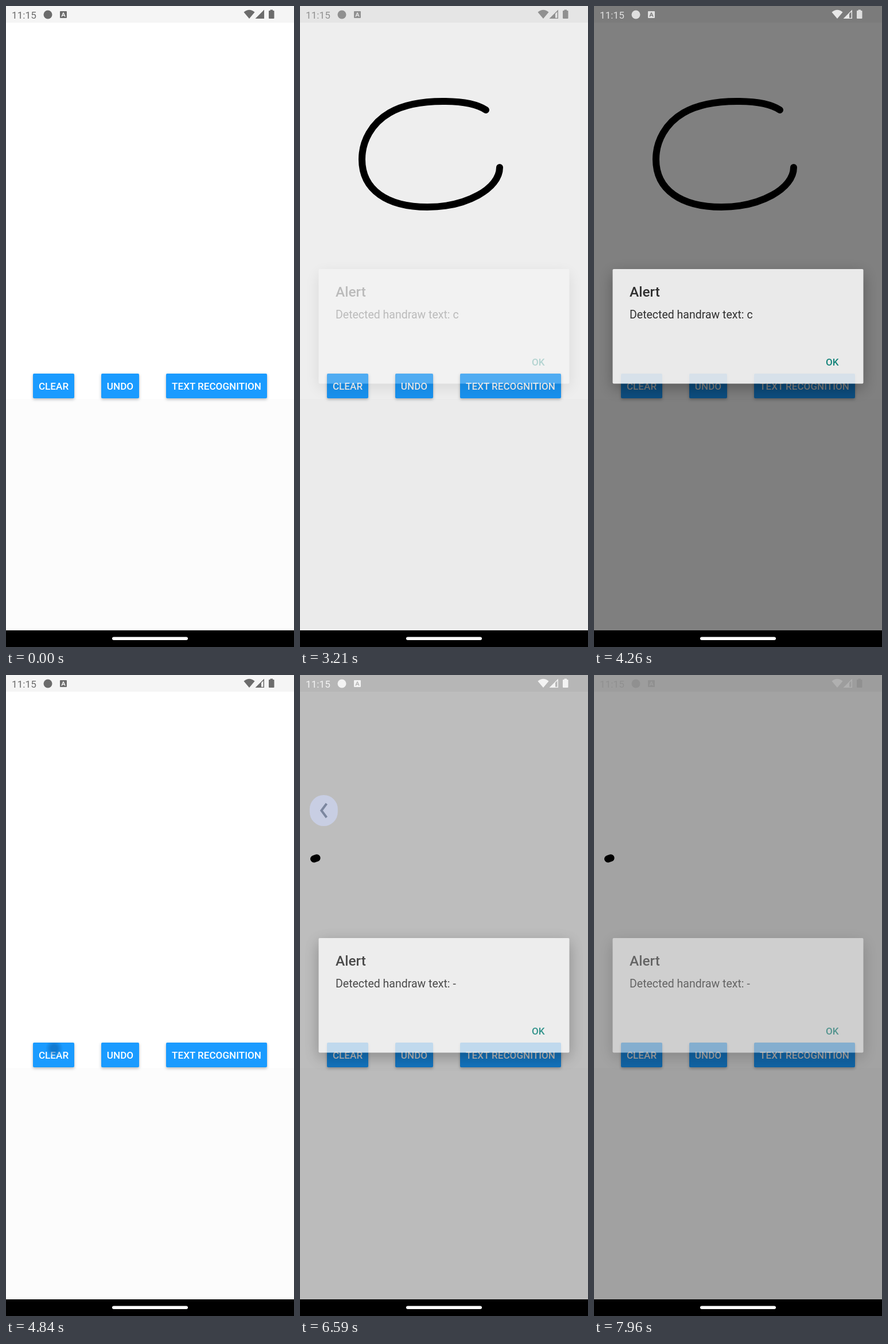
Animation of 502 by 1116 pixels, one loop 8 s. Source, as an HTML page:

```html
<!DOCTYPE html>
<html lang="en">
<head>
<meta charset="utf-8">
<title>Handwriting pad</title>
<style>
  html, body { margin: 0; width: 100%; height: 100%; overflow: hidden; background: #fff; }
  svg { display: block; width: 100%; height: 100%; }
  text { font-family: Roboto, sans-serif; }
  .medium { font-weight: 500; }
  .ink { fill: none; stroke: #000; stroke-linecap: round; stroke-linejoin: round; }
  .raised { filter: drop-shadow(0 2px 2.5px rgba(0, 0, 0, .27)); }
  #dialog .card { filter: drop-shadow(0 8px 13px rgba(0, 0, 0, .36)); }
</style>
</head>
<body>
<svg viewBox="0 0 502 1116">
  <defs>
    <clipPath id="clearClip"><rect x="47" y="640" width="72" height="43" rx="2"/></clipPath>
    <radialGradient id="rippleFill">
      <stop offset=".35" stop-color="#0b63b0" stop-opacity=".6"/>
      <stop offset="1" stop-color="#0b63b0" stop-opacity="0"/>
    </radialGradient>
  </defs>

  <rect width="502" height="684" fill="#fff"/>
  <rect y="684" width="502" height="403" fill="#fcfcfc"/>
  <rect width="502" height="29" fill="#f5f5f5"/>

  <path id="letter" class="ink" stroke-width="12" pathLength="1"
    d="M324 181C306 169 278 166 249 166C206 166 175 175 156 186C125 204 108 235 108 267C108 320 152 350 222 350C290 350 348 318 348 281"/>
  <path id="dash" class="ink" stroke-width="12.6"/>

  <g id="buttons"></g>
  <circle id="ripple" cx="84" cy="650" fill="url(#rippleFill)" clip-path="url(#clearClip)"/>

  <rect id="dim" width="502" height="1087" fill="#000"/>
  <g id="dialog">
    <rect class="card" x="32.5" y="458" width="437" height="199.5" rx="2" fill="#fff"/>
    <text class="medium" x="62" y="506" font-size="24.4" fill="#212121">Alert</text>
    <text id="message" x="62" y="544" font-size="19.5" fill="#212121"></text>
    <text class="medium" x="404" y="626" font-size="17.1" fill="#00857a">OK</text>
  </g>

  <g id="notices">
    <text x="10" y="21.5" font-size="17.2">11:15</text>
    <circle cx="73" cy="15" r="7.5"/>
    <path fill-rule="evenodd" d="M95 9h10q1 0 1 1v10q0 1-1 1h-10q-1 0-1-1v-10q0-1 1-1zM99.2 11.5l-2.9 7h1.7l.5-1.4h3l.5 1.4h1.7l-2.9-7zM99 15.7h2l-1-2.7z"/>
    <path d="M460.5 8v-1.5h4.5v1.5h1.5q1 0 1 1v12q0 1-1 1h-7.500q-1 0-1-1v-12q0-1 1-1z"/>
  </g>
  <g id="radio">
    <path d="M414.500 10.800Q424 2.600 433.500 10.800L424 22z"/>
    <path id="signal" fill-rule="evenodd"/>
  </g>

  <g id="bubble">
    <rect id="disc" fill="#c8cee3"/>
    <path id="arrow" fill="none" stroke="#7c879f" stroke-width="4"/>
  </g>

  <rect y="1087" width="502" height="29" fill="#000"/>
  <rect x="185" y="1098.500" width="132" height="5.500" rx="2.750" fill="#fff"/>
</svg>
<script>
const LOOP = 8000, DIM = 0.553;
const $ = id => document.getElementById(id);
const set = (id, attrs) => {
  for (const key in attrs) $(id).setAttribute(key, attrs[key]);
};
const clamp = x => Math.max(0, Math.min(1, x));
const ramp = (t, a, b) => clamp((t - a) / (b - a));
const mix = (a, b, p) => a + (b - a) * p;
const snap = (t, from, step) => from + Math.floor((t - from) / step) * step;
const gray = v => `rgb(${[v, v, v].map(Math.round)})`;

$('buttons').innerHTML = [['CLEAR', 47, 72], ['UNDO', 166, 66], ['TEXT RECOGNITION', 279, 176]]
  .map(([label, x, w]) =>
    `<rect class="raised" x="${x}" y="640" width="${w}" height="43" rx="2" fill="#1a9bff"/>
     <text class="medium" x="${x + w / 2}" y="668" font-size="17.1" text-anchor="middle" fill="#fff">${label}</text>`)
  .join('');

const alerts = [
  { text: 'c', open: 3210, openStep: 43, close: 4260, closeStep: 55 },
  { text: '-', open: 6540, openStep: 50, close: 7910, closeStep: 50 }
];

function drawInk(t) {
  const p = ramp(t, 515, 1320);
  const drawn = mix(p, p * p * (3 - 2 * p), 0.5);
  set('letter', {
    visibility: t >= 530 && t < 4840 ? 'visible' : 'hidden',
    'stroke-dasharray': p < 1 ? `${drawn} 2` : 'none'
  });
  const q = ramp(t, 6330, 6420);
  set('dash', {
    visibility: t >= 6330 ? 'visible' : 'hidden',
    d: `M24.300 320.200L${mix(24.4, 29.3, q)} ${mix(320.1, 318.6, q)}`
  });
}

function drawRipple(t) {
  const p = ramp(t, 4840, 4970);
  set('ripple', { r: mix(15, 60, p), opacity: t >= 4840 ? 1 - p : 0 });
}

function drawAlert(t) {
  const a = alerts.find(a => t >= a.open && t < a.close + 260);
  let dim = 0, alpha = 0, tint = 0, radioTint = 0;
  if (a && t < a.close) {
    const age = snap(t, a.open, a.openStep) - a.open + 18;
    dim = clamp(age / 146);
    alpha = 1 - Math.pow(1 - dim, 2.1);
    tint = radioTint = clamp(age / 74);
  } else if (a) {
    const age = snap(t, a.close, a.closeStep) - a.close + 20;
    dim = clamp(1 - age / 200);
    alpha = Math.pow(dim, 1.7);
    tint = clamp(1 - age / 93);
    radioTint = clamp(1 - age / 130);
  }
  set('dim', { opacity: dim * DIM });
  set('dialog', { opacity: alpha });
  $('message').textContent = 'Detected handraw text: ' + (a ? a.text : '');
  set('notices', { fill: gray(mix(108, 255, tint)) });
  set('radio', { fill: gray(mix(108, 255, radioTint)) });
  set('signal', {
    d: 'M434.500 22L450 6.500V22z' + (t >= 1800 ? 'M445 13.500L448.500 10V20.800H445z' : '')
  });
}

// Back-swipe bubble: slides in, settles, pops and fades.
function drawBubble(t) {
  const enter = 1 - Math.pow(1 - ramp(t, 6400, 6600), 2);
  const settle = ramp(t, 6640, 6860);
  const pop = ramp(t, 7110, 7170);
  const fade = ramp(t, 7170, 7340);
  const grow = mix(mix(mix(24.5, 30, settle), 32, pop), 25, fade);
  const tall = mix(2.5, 0, settle);
  const cx = mix(mix(-26, 41.5, enter), 46.5, settle);
  const cy = mix(236, 233, settle);
  const reach = mix(mix(12, 10, settle), 9.5, fade);
  const half = mix(5, 4.5, settle);
  set('bubble', {
    visibility: t >= 6400 && t < 7910 ? 'visible' : 'hidden',
    opacity: mix(1, 0.07, fade)
  });
  set('disc', {
    x: cx - grow, y: cy - grow - tall, width: 2 * grow, height: 2 * (grow + tall), rx: grow, ry: grow
  });
  set('arrow', {
    d: `M${cx + half} ${cy - reach}L${cx - half + 1} ${cy}L${cx + half} ${cy + reach}`,
    stroke: fade < 1 ? '#7c879f' : '#000'
  });
}

function render(t) {
  drawInk(t);
  drawRipple(t);
  drawAlert(t);
  drawBubble(t);
}

const start = performance.now();
function tick() {
  render((performance.now() - start) % LOOP);
  requestAnimationFrame(tick);
}
tick();
</script>
</body>
</html>
```
